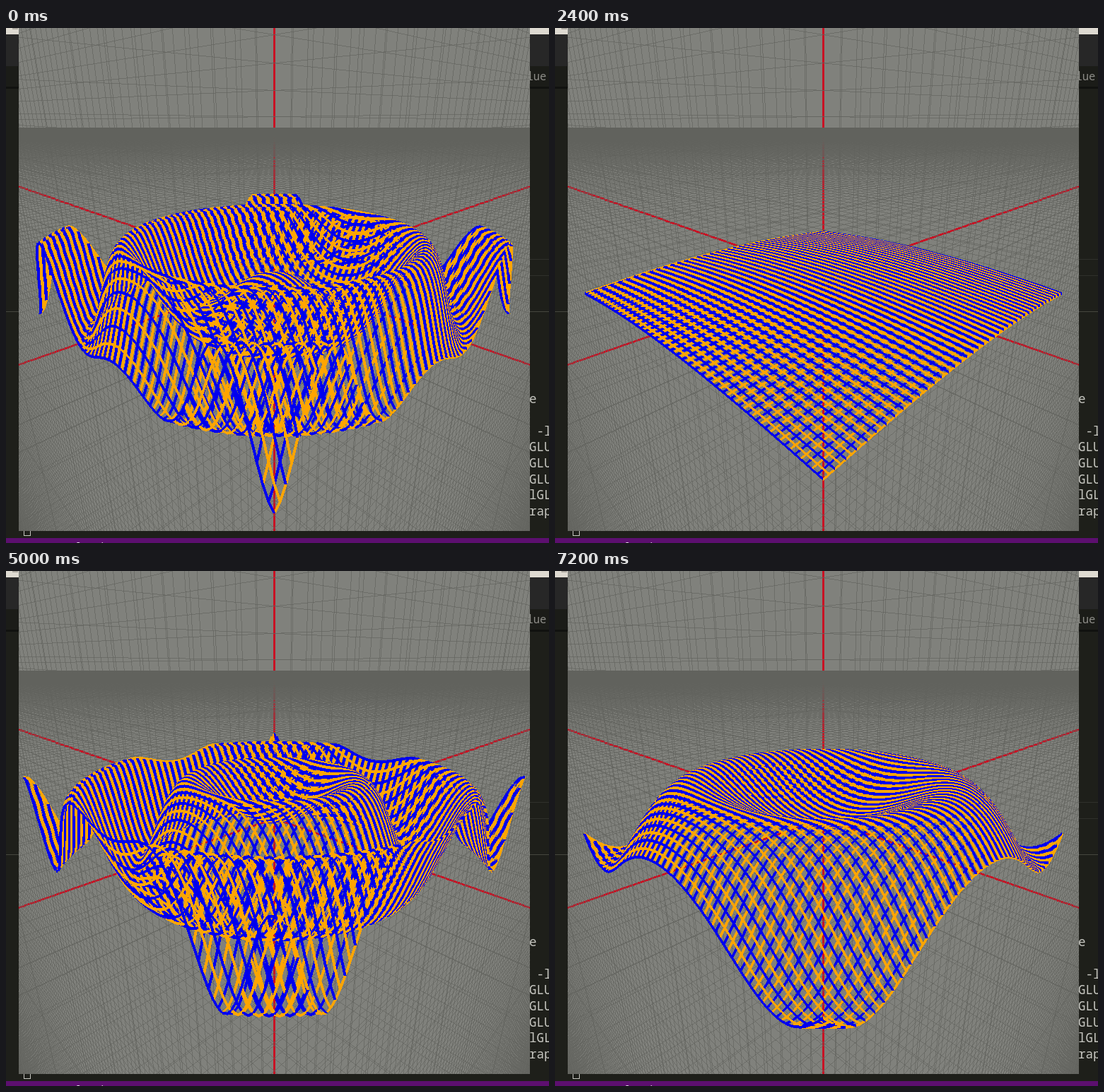
An HTML page with a canvas for the animation above (7.4 s loop, 768x729 px).

```html
<!DOCTYPE html>
<html lang="en">
<head>
<meta charset="utf-8">
<title>Wave surface</title>
<style>
html, body { margin: 0; width: 100%; height: 100%; overflow: hidden; background: #1e1f1a; }
svg, canvas { position: absolute; display: block; }
svg { left: 0; top: 0; }
canvas { left: 18px; top: 0; }
text { font-family: "Noto Sans Mono", "DejaVu Sans Mono", monospace; white-space: pre; }
.code { font-size: 17.5px; fill: #c6c6c0; }
</style>
</head>
<body>
<svg width="768" height="729" viewBox="0 0 768 729">
  <rect width="768" height="729" fill="#1e1f1a"/>
  <rect width="768" height="9" fill="#dedad1"/>
  <rect x="9" width="8" height="2" fill="#aaa69e"/>
  <rect y="9" width="768" height="45" fill="#272727"/>
  <rect y="54" width="768" height="29" fill="#1b1c18"/>
  <rect y="83" width="768" height="3" fill="#11120f"/>
  <path d="M741 327.5h27M741 350.5h27" stroke="#30312c"/>
  <path d="M0 401.5h768" stroke="#45463f"/>
  <text x="736.5" y="74" font-size="15.5" fill="#8c8c87">lue</text>
  <g class="code">
    <text x="740" y="531">e</text>
    <text x="740" y="577"> -l</text>
    <text x="740" y="599">GLU</text>
    <text x="740" y="622">GLU</text>
    <text x="740" y="645">GLU</text>
    <text x="740" y="667">lGL</text>
    <text x="740" y="690">rap</text>
  </g>
  <rect x="25.5" y="705.5" width="9" height="13" fill="none" stroke="#c6c6c0"/>
  <rect y="722" width="768" height="7" fill="#5c0f6f"/>
  <text x="98" y="738" font-size="14" fill="#eee">O</text>
  <text x="133" y="738" font-size="14" fill="#eee">)</text>
</svg>
<canvas id="view" width="723" height="712"></canvas>
<script>
const W = 723, H = 712, CX = 361.5, CY = 350.5;
const FOCAL = 626.1, DIST = 10.35, SIN = 0.349, COS = Math.sqrt(1 - SIN * SIN);
const NEAR = 0.1, FAR = 100, REACH = 110;
const HALF = 4, CELLS = 80;
const LOOP = 7400, TICK = 200;

const rgb = (r, g, b) => (255 << 24 | b << 16 | g << 8 | r) >>> 0;
const GRAY = rgb(128, 129, 124), MESH = rgb(97, 98, 93), RED = rgb(200, 18, 36);
const BLUE = rgb(0, 0, 238), ORANGE = rgb(255, 165, 0);

const ctx = document.getElementById('view').getContext('2d');
const image = ctx.createImageData(W, H);
const pixels = new Uint32Array(image.data.buffer);

// Camera space: right, up, distance along the view direction
function toCamera(x, y, z) {
  const side = (x - y) * Math.SQRT1_2, front = (x + y) * Math.SQRT1_2;
  return [side, z * COS - front * SIN, DIST - front * COS - z * SIN];
}

const project = ([x, y, d]) => [CX + FOCAL * x / d, CY - FOCAL * y / d];

function blend(under, over, alpha) {
  const mix = shift => {
    const u = under >> shift & 255, o = over >> shift & 255;
    return Math.round(u + (o - u) * alpha);
  };
  return rgb(mix(0), mix(8), mix(16));
}

// Hard-edged line, widened across its minor axis
function line(a, b, width, color, alpha = 1) {
  const m = Math.abs(b[0] - a[0]) >= Math.abs(b[1] - a[1]) ? 0 : 1, n = 1 - m;
  if (a[m] > b[m]) [a, b] = [b, a];
  const slope = (b[n] - a[n]) / (b[m] - a[m]);
  const end = Math.min(m ? H : W, Math.ceil(b[m] - 0.5));
  const limit = m ? W : H;
  for (let i = Math.max(0, Math.ceil(a[m] - 0.5)); i < end; i++) {
    const first = Math.floor(a[n] + (i + 0.5 - a[m]) * slope - (width - 1) / 2);
    for (let q = Math.max(0, first); q < Math.min(limit, first + width); q++) {
      const at = m ? i * W + q : q * W + i;
      pixels[at] = alpha < 1 ? blend(pixels[at], color, alpha) : color;
    }
  }
}

// Line in the world, cut at the near and far planes
function worldLine(from, to, width, color, alpha) {
  const a = toCamera(...from), b = toCamera(...to);
  const mix = t => a.map((v, i) => v + (b[i] - v) * t);
  const span = b[2] - a[2];
  const u = (NEAR - a[2]) / span, v = (FAR - a[2]) / span;
  const t0 = Math.max(0, Math.min(u, v)), t1 = Math.min(1, Math.max(u, v));
  if (t0 < t1) line(project(mix(t0)), project(mix(t1)), width, color, alpha);
}

// Line parallel to one axis, shifted along another
function axisLine(along, shifted, offset, width, color, alpha) {
  const from = [0, 0, 0], to = [0, 0, 0];
  from[along] = -REACH;
  to[along] = REACH;
  from[shifted] = to[shifted] = offset;
  worldLine(from, to, width, color, alpha);
}

function drawRoom() {
  pixels.fill(GRAY);
  for (let a = 0; a < 3; a++) axisLine(a, (a + 1) % 3, 0, 3, RED);
  for (let a = 0; a < 3; a++) {
    for (let b = 0; b < 3; b++) {
      if (a === b) continue;
      for (let s = 0.5; s <= REACH; s += 0.5) {
        axisLine(a, b, s, 1, MESH, 0.65);
        axisLine(a, b, -s, 1, MESH, 0.65);
      }
    }
  }
}

drawRoom();
const room = pixels.slice();

// Wave number swings back and forth at a steady rate
function waveNumber(ms) {
  const t = ms / 1000, turn = 5.365;
  return 0.176 * ((t < turn ? t : 2 * turn - t) - 2.484);
}

// Lines along y first, lines along x painted over them
function drawSurface(k) {
  const at = i => -HALF + 2 * HALF * i / CELLS;
  const point = (i, j) => {
    const x = at(i), y = at(j);
    return project(toCamera(x, y, Math.sin(k * (x * x + y * y))));
  };
  const sweep = (colors, place) => {
    for (let i = 0; i <= CELLS; i++) {
      let last = place(i, 0);
      for (let j = 1; j <= CELLS; j++) {
        const next = place(i, j);
        line(last, next, 4, colors[i % 2]);
        last = next;
      }
    }
  };
  sweep([ORANGE, BLUE], point);
  sweep([BLUE, ORANGE], (i, j) => point(j, i));
}

function render(ms) {
  pixels.set(room);
  drawSurface(waveNumber(ms));
  ctx.putImageData(image, 0, 0);
}

const start = performance.now();
let shown = -1;
function frame() {
  const tick = Math.floor((performance.now() - start) % LOOP / TICK);
  if (tick !== shown) {
    shown = tick;
    render(tick * TICK);
  }
  requestAnimationFrame(frame);
}
frame();
</script>
</body>
</html>
```
